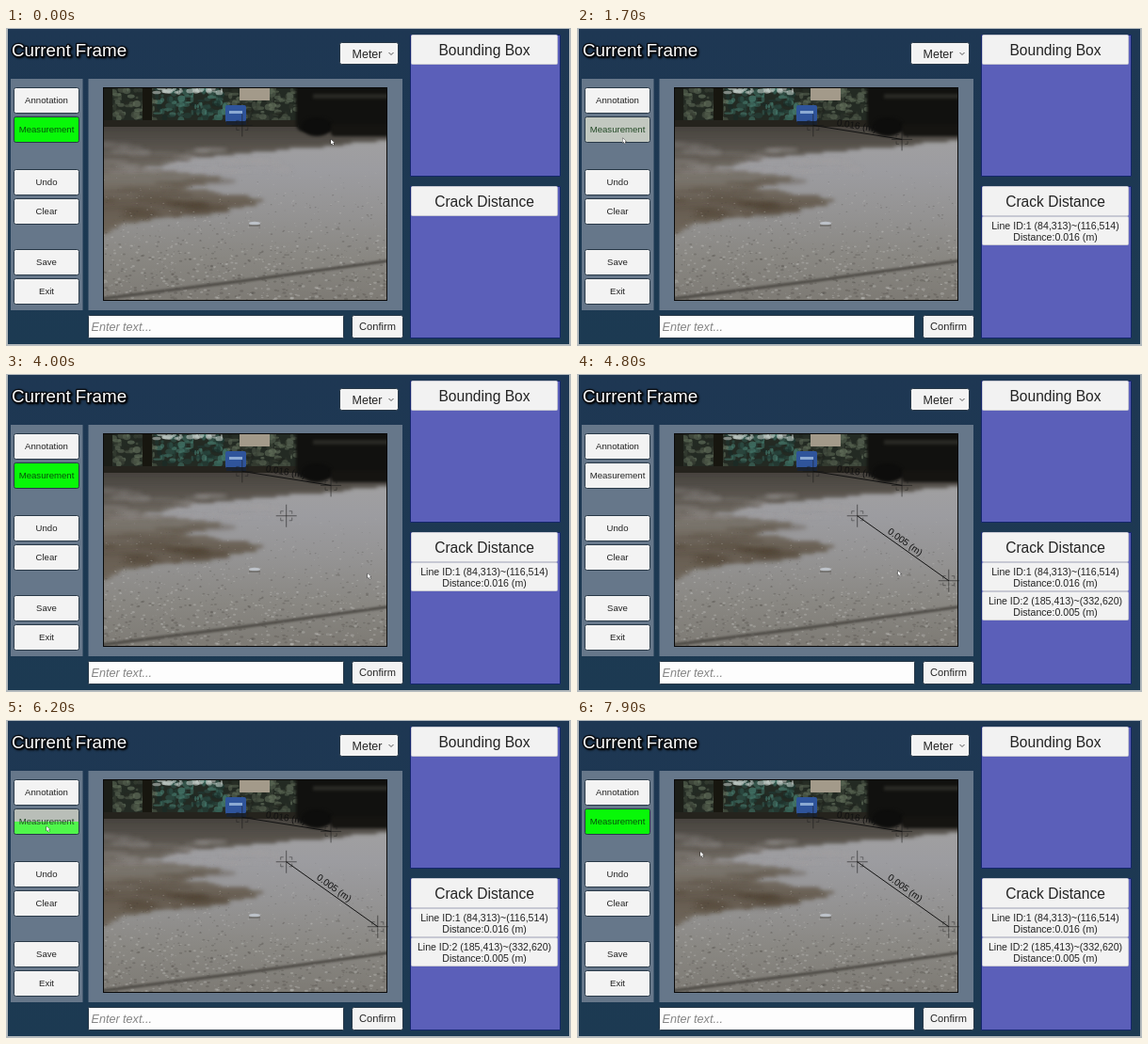
Animation of 600 by 338 pixels, one loop 8000 ms. Source, as an HTML page with a canvas:

```html
<!DOCTYPE html>
<html lang="en">
<head>
<meta charset="utf-8">
<title>Crack measurement</title>
<style>
html, body { margin: 0; width: 100%; height: 100%; overflow: hidden; background: #1d3852; }
canvas { display: block; }
</style>
</head>
<body>
<canvas id="stage" width="600" height="338"></canvas>
<script>
const LOOP = 8000;
const FONT = '"Liberation Sans", Arial, sans-serif';
const INK = '#232323', PAPER = '#f3f3f3', EDGE = '#283847', SLATE = '#66778a';
const ctx = document.getElementById('stage').getContext('2d');

// Image coordinates (row, column) to stage position.
const place = (row, col) => [104 + col * .469, 64 + row * .469];

// Measured lines: end points in the image, distance, times of the two clicks.
const lines = [
  { from: [84, 313], to: [116, 514], distance: '0.016 (m)', start: 0, end: 200 },
  { from: [185, 413], to: [332, 620], distance: '0.005 (m)', start: 3700, end: 4450 }
];
const presses = [1850, 6200];

// Pointer moves: departure, arrival, destination.
const moves = [
  [0, 0, place(...lines[0].to)],
  [250, 1600, [48.5, 117]],
  [1900, 2700, [178.5, 285]],
  [2700, 3600, place(...lines[1].from)],
  [3700, 4080, place(...lines[1].to)],
  [4500, 5500, [146, 170]],
  [5500, 6150, [43, 113]],
  [6400, 7900, [131, 140]]
];

function seeded(seed) {
  return () => (seed = (seed * 16807) % 2147483647) / 2147483647;
}

function fade(g, y0, y1, ...colors) {
  const gradient = g.createLinearGradient(0, y0, 0, y1);
  colors.forEach((c, i) => gradient.addColorStop(i / (colors.length - 1), c));
  return gradient;
}

function box(g, x, y, w, h, fill, border, radius = 0) {
  g.beginPath();
  g.roundRect(x, y, w, h, radius);
  g.fillStyle = fill;
  g.fill();
  if (border) {
    g.strokeStyle = border;
    g.lineWidth = 1;
    g.stroke();
  }
}

function text(g, str, x, y, size, color = INK, align = 'center', style = '') {
  g.font = `${style} ${size}px ${FONT}`;
  g.textAlign = align;
  g.fillStyle = color;
  g.fillText(str, x, y);
}

function button(g, label, x, y, w, h, size, fill = PAPER, color) {
  box(g, x, y, w, h, fill, EDGE, 2);
  text(g, label, x + w / 2, y + h / 2 + size * .36, size, color);
}

const toolButton = (g, label, y, fill, color) => button(g, label, 8.5, y - .5, 69, 27, 9.6, fill, color);

function blob(g, x, y, rx, ry, color) {
  g.fillStyle = color;
  g.beginPath();
  g.ellipse(x, y, rx, ry, 0, 0, 7);
  g.fill();
}

function stroke(g, color, width, ...points) {
  g.strokeStyle = color;
  g.lineWidth = width;
  g.beginPath();
  points.forEach(p => g.lineTo(...p));
  g.stroke();
}

function drawShade(g, rnd) {
  // The right edge of the shade is a sum of bell-shaped lobes.
  const lobe = (y, middle, spread, reach) => reach * Math.exp(-(((y - middle) / spread) ** 2));
  g.filter = 'blur(2px)';
  g.fillStyle = fade(g, 100, 220, '#27241f', '#4a4339', '#746c61', '#5b4f3f', '#685d4f');
  for (let y = 100; y < 220; y += 2) {
    const edge = 104 + lobe(y, 100, 30, 420) + lobe(y, 159, 9, 100) + lobe(y, 184, 15, 165);
    g.fillRect(95, y, edge - 95 + (rnd() - .5) * 24, 2.5);
  }
  for (let i = 0; i < 45; i++) {
    const y = 122 + rnd() * 32;
    blob(g, 104 + rnd() * (y - 95) * 4, y, 6 + rnd() * 18, .8 + rnd() * 1.5, 'rgba(165,163,162,.3)');
  }
  for (let i = 0; i < 25; i++) {
    blob(g, 105 + rnd() * 120, 162 + rnd() * 45, 8 + rnd() * 22, 1 + rnd() * 3, 'rgba(73,60,43,.3)');
  }
  g.filter = 'none';
}

function drawBackdrop(g, rnd) {
  g.fillStyle = '#232a23';
  g.fillRect(104, 64, 301, 39);
  g.filter = 'blur(.7px)';
  for (let i = 0; i < 320; i++) {
    const x = 104 + rnd() * 205, teal = x > 160 && x < 235;
    const color = `hsla(${teal ? 165 : 100}, ${teal ? 28 : 10}%, ${12 + rnd() * 32}%, .6)`;
    blob(g, x, 64 + rnd() * 34, 1 + rnd() * 4, 1 + rnd() * 3, color);
  }
  for (let i = 0; i < 28; i++) {
    blob(g, 160 + rnd() * 75, 64 + rnd() * 5, 1 + rnd() * 4, 1 + rnd() * 2, 'rgba(190,200,195,.6)');
  }
  box(g, 248, 62, 32, 15, '#a39a8a');
  box(g, 145, 62, 10, 43, '#17160f');
  box(g, 104, 62, 9, 42, '#1b1d17');
  g.fillStyle = '#25231d';
  g.fillRect(100, 98, 210, 7);

  // Blue vehicle
  box(g, 233, 82, 22, 18, '#2f549b', null, 2);
  box(g, 237, 88, 14, 3, '#8ba9d2');
  box(g, 234, 99, 21, 4, '#1a2230');

  // Parked car
  g.filter = 'blur(1.5px)';
  box(g, 308, 55, 110, 55, '#11110f', null, 8);
  blob(g, 330, 105, 16, 10, '#0d0d0c');
  box(g, 345, 102, 70, 13, '#151411', null, 4);
  box(g, 326, 70, 80, 5, '#292924');
  g.filter = 'none';
}

function drawStreet(g) {
  const rnd = seeded(71);
  g.save();
  g.beginPath();
  g.rect(103.5, 63.5, 301, 226);
  g.clip();
  g.fillStyle = fade(g, 105, 290, '#a2a1a1', '#9c9ca0', '#949393', '#898782', '#7d7a74');
  g.fillRect(103, 63, 302, 227);
  drawShade(g, rnd);
  drawBackdrop(g, rnd);

  // Pavement grain grows towards the viewer
  for (let i = 0; i < 1100; i++) {
    const depth = Math.sqrt(rnd()), size = .5 + rnd() * depth * 1.8;
    const color = rnd() < .5 ? 'rgba(205,205,203,.3)' : 'rgba(60,56,50,.24)';
    blob(g, 104 + rnd() * 301, 140 + depth * 150, size, size * .6, color);
  }
  g.filter = 'blur(.8px)';
  stroke(g, '#4d4a45', 3, [100, 288], [250, 269], [410, 247]);
  g.filter = 'none';
  blob(g, 264, 207.5, 6, 1.8, '#bcc1c8');
  stroke(g, '#5a5854', 1, [258, 210], [270, 210]);
  g.restore();
  g.strokeStyle = '#090909';
  g.lineWidth = 1;
  g.strokeRect(103.5, 63.5, 301, 226);
}

function drawPanel(g, title, y, h) {
  box(g, 429.5, y, 159, h, '#5b5fb9', '#15266c');
  box(g, 430.5, y, 155, 31, '#f2f2f2', '#c7c8d3', 1);
  text(g, title, 508, y + 21, 15.6);
}

function drawFixed() {
  const canvas = document.createElement('canvas');
  canvas.width = 600;
  canvas.height = 338;
  const g = canvas.getContext('2d');
  box(g, 0, 0, 600, 338, '#b4babd');
  box(g, 2, 1, 596, 335, fade(g, 0, 338, '#1e3753', '#1c3a52'));

  g.save();
  g.shadowColor = '#000';
  g.shadowOffsetX = g.shadowOffsetY = 1;
  g.shadowBlur = 2;
  g.font = `18.8px ${FONT}`;
  g.lineWidth = 2.5;
  g.lineJoin = 'round';
  g.strokeStyle = '#080b10';
  g.strokeText('Current Frame', 6, 30);
  g.restore();
  text(g, 'Current Frame', 6, 30, 18.8, '#fff', 'left');

  box(g, 5, 54, 76.5, 246, SLATE);
  box(g, 87.5, 54, 333.5, 246, SLATE);
  drawStreet(g);

  // Tool buttons stand in groups, 31 px apart
  [[64, 'Annotation'], [151, 'Undo', 'Clear'], [236, 'Save', 'Exit']].forEach(([top, ...labels]) =>
    labels.forEach((label, i) => toolButton(g, label, top + i * 31)));

  box(g, 354.5, 15.5, 62, 23, PAPER, EDGE, 2);
  text(g, 'Meter', 383.5, 31.5, 12.5);
  stroke(g, '#555', 1, [406.5, 26], [409, 28.5], [411.5, 26]);
  box(g, 87.5, 305.5, 271, 24, '#fdfdfd', EDGE, 1);
  text(g, 'Enter text...', 90.5, 322, 12.6, '#858585', 'left', 'italic');
  button(g, 'Confirm', 367.5, 305.5, 54, 24, 11.1);

  drawPanel(g, 'Bounding Box', 7.5, 150);
  drawPanel(g, 'Crack Distance', 168.5, 161);
  return canvas;
}

function drawMeasure(t) {
  const press = presses.findLast(p => t >= p - 250);
  const line = lines[presses.indexOf(press) + (press ? 0 : 0)];
  const next = press === undefined ? lines[0] : lines[presses.indexOf(press) + 1];
  const armed = !next || t < next.end;
  if (!armed) return toolButton(ctx, 'Measurement', 95);

  // After a press the green rises from the bottom edge.
  const rise = press === undefined ? 1 : Math.min(1, Math.max(0, (t - press + 50) / 100));
  const fill = ctx.createLinearGradient(0, 122, 0, 95);
  fill.addColorStop(0, rise ? (rise < 1 ? '#50f64b' : '#08f808') : '#c2c8c0');
  if (rise && rise < 1) {
    fill.addColorStop(rise, '#50f64b');
    fill.addColorStop(rise, '#b9beb8');
  }
  toolButton(ctx, 'Measurement', 95, fill, rise < 1 ? '#214824' : '#07500b');
}

function reticle([x, y]) {
  const color = 'rgba(25,25,25,.7)';
  stroke(ctx, color, .8, [x - 11, y], [x + 11, y]);
  stroke(ctx, color, .8, [x, y - 12], [x, y + 12]);
  for (const sx of [-1, 1]) for (const sy of [-1, 1]) {
    stroke(ctx, color, .6, [x + sx * 3, y + sy * 5], [x + sx * 6, y + sy * 5], [x + sx * 6, y + sy * 2]);
  }
}

function drawLine({ from, to, distance, start, end }, i, t) {
  if (t < start) return;
  const a = place(...from), b = place(...to);
  reticle(a);
  if (t < end) return;
  reticle(b);
  stroke(ctx, '#111', 1, a, b);
  ctx.save();
  ctx.translate((a[0] + b[0]) / 2, (a[1] + b[1]) / 2);
  ctx.rotate(Math.atan2(b[1] - a[1], b[0] - a[0]));
  text(ctx, distance, -2, -3.5, 10, '#111');
  ctx.restore();

  const y = 200.5 + i * 31;
  box(ctx, 430.5, y, 155, 30, '#f2f2f2', '#c7c8d3', 1);
  text(ctx, `Line ID:${i + 1} (${from})~(${to})`, 508, y + 13.3, 10.6);
  text(ctx, 'Distance:' + distance, 508, y + 25.3, 10.6);
}

function pointerAt(t) {
  const i = moves.findLastIndex(m => t >= m[0]);
  const [leave, arrive, goal] = moves[i];
  if (t >= arrive) return goal;
  const origin = moves[i - 1][2], u = (t - leave) / (arrive - leave), k = u * u * (3 - 2 * u);
  return origin.map((v, j) => v + (goal[j] - v) * k);
}

function drawPointer(t) {
  ctx.save();
  ctx.translate(...pointerAt(t));
  const arrow = new Path2D('M0 0V5L1.2 4 2.2 6 3.1 5.5 2.2 3.6H3.8Z');
  ctx.strokeStyle = '#222';
  ctx.lineWidth = .8;
  ctx.stroke(arrow);
  ctx.fillStyle = '#fff';
  ctx.fill(arrow);
  ctx.restore();
}

const fixed = drawFixed();
const began = performance.now();

function draw() {
  const t = (performance.now() - began) % LOOP;
  ctx.drawImage(fixed, 0, 0);
  drawMeasure(t);
  lines.forEach((line, i) => drawLine(line, i, t));
  drawPointer(t);
  requestAnimationFrame(draw);
}
draw();
</script>
</body>
</html>
```
